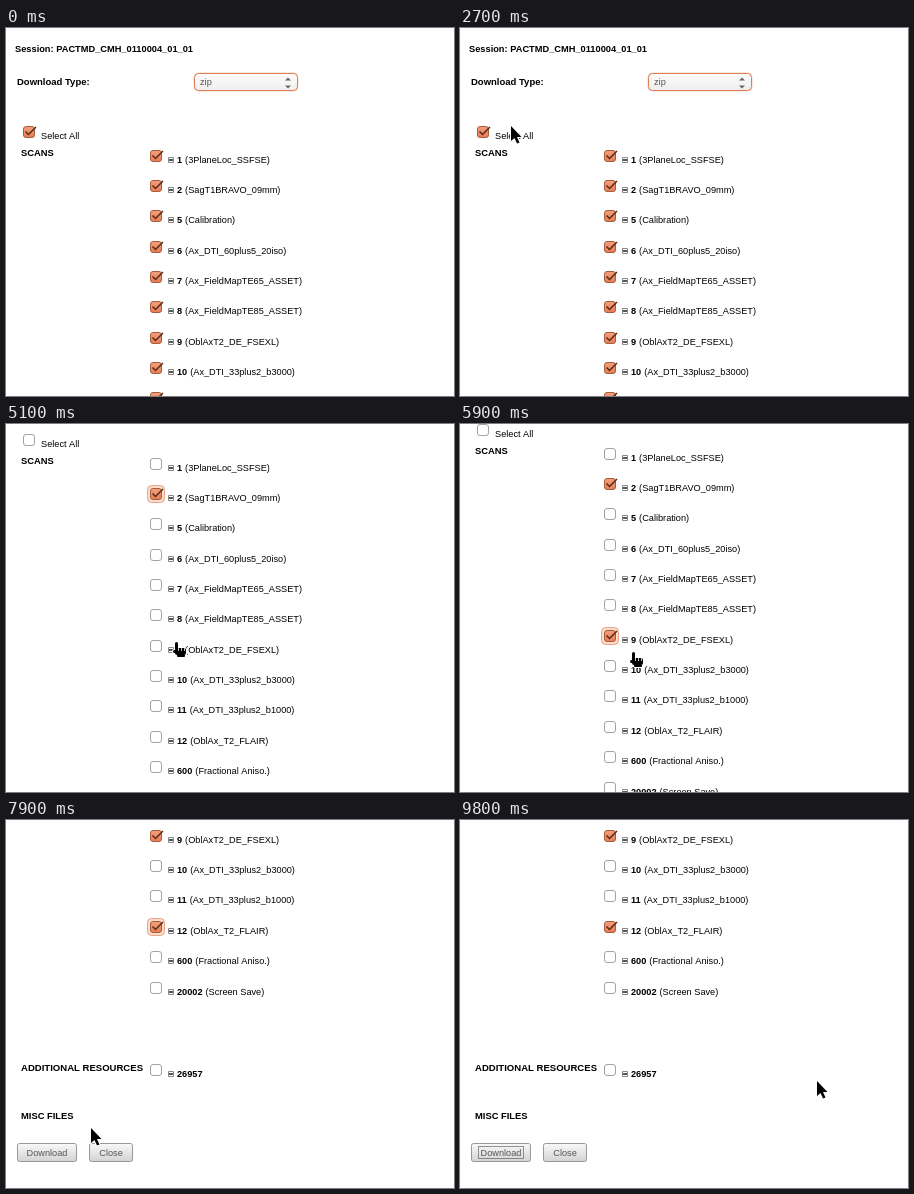
Write an HTML page with a canvas that moves like this. It is 448 px wide and 368 px high and loops after 9900 ms.

```html
<!DOCTYPE html>
<html lang="en">
<head>
<meta charset="utf-8">
<title>Scan download</title>
<style>
html, body { margin: 0; width: 100%; height: 100%; overflow: hidden; background: #fff; }
canvas { display: block; }
</style>
</head>
<body>
<canvas id="stage" width="448" height="368"></canvas>
<script>
const ctx = document.getElementById('stage').getContext('2d');
const LOOP = 9900, STEP = 100;
const SANS = '"Liberation Sans", Arial, sans-serif';
const DIALOG = '"Open Sans", "Noto Sans", sans-serif';
const INK = '#3c3c3c';
const session = 'PACTMD_CMH_0110004_01_01';
const archive = session + '_2_27_2016_19_32_45.zip';

const scans = `1 (3PlaneLoc_SSFSE)
2 (SagT1BRAVO_09mm)
5 (Calibration)
6 (Ax_DTI_60plus5_20iso)
7 (Ax_FieldMapTE65_ASSET)
8 (Ax_FieldMapTE85_ASSET)
9 (OblAxT2_DE_FSEXL)
10 (Ax_DTI_33plus2_b3000)
11 (Ax_DTI_33plus2_b1000)
12 (OblAx_T2_FLAIR)
600 (Fractional Aniso.)
20002 (Screen Save)`.split('\n');

const clearTime = 3100, openTime = 8400, closeTime = 9500;
const pickTimes = { 2: 3900, 9: 5600, 12: 6800 };

// Pointer stops: arrival time and place
const stops = [
  [2300, 215, 90], [2700, 51, 98], [clearTime, 22, 104], [pickTimes[2], 149, 159],
  [4600, 190, 224], [pickTimes[9], 150, 212], [5900, 173, 228], [pickTimes[12], 150, 191],
  [7100, 172, 258], [openTime, 42, 332], [8700, 107, 191], [9400, 390, 268], [9800, 357, 261]
];

function ease(u) {
  u = Math.min(1, Math.max(0, u));
  return u * u * (3 - 2 * u);
}

const scrollAt = t =>
  98 * ease((t - 4700) / 500) + 112 * ease((t - 6000) / 500) + 84 * ease((t - 7300) / 400);

function pointerAt(t) {
  const next = stops.find(s => s[0] >= t) || stops[stops.length - 1];
  const last = stops[Math.max(0, stops.indexOf(next) - 1)];
  const e = ease((t - last[0]) / (next[0] - last[0] || 1));
  return [1, 2].map(i => Math.round(last[i] + (next[i] - last[i]) * e));
}

function text(str, x, y, { size = 9.2, bold = false, color = '#000', font = SANS, align = 'left' } = {}) {
  ctx.font = `${bold ? 'bold ' : ''}${size}px ${font}`;
  ctx.fillStyle = color;
  ctx.textAlign = align;
  ctx.fillText(str, x, y);
  return ctx.measureText(str).width;
}

function paint(fill, stroke) {
  if (fill) { ctx.fillStyle = fill; ctx.fill(); }
  if (stroke) { ctx.strokeStyle = stroke; ctx.lineWidth = 1; ctx.stroke(); }
}

function box(x, y, w, h, r, fill, stroke) {
  ctx.beginPath();
  ctx.roundRect(x + .5, y + .5, w - 1, h - 1, r);
  paint(fill, stroke);
}

function disc(x, y, r, fill, stroke) {
  ctx.beginPath();
  ctx.arc(x, y, r, 0, 7);
  paint(fill, stroke);
}

function bar(x, y, w, h, color) {
  ctx.fillStyle = color;
  ctx.fillRect(x, y, w, h);
}

function fade(y, h, top, bottom) {
  const g = ctx.createLinearGradient(0, y, 0, y + h);
  g.addColorStop(0, top);
  g.addColorStop(1, bottom);
  return g;
}

function spinner(x, y) {
  for (const dir of [-1, 1]) {
    ctx.beginPath();
    ctx.moveTo(x - 3, y + 2.5 * dir);
    ctx.lineTo(x + 3, y + 2.5 * dir);
    ctx.lineTo(x, y + 5.5 * dir);
    paint('#666');
  }
}

function checkbox(x, y, on, focused) {
  if (focused) box(x - 3, y - 3, 18, 18, 4, '#fbdccd', '#e9a486');
  box(x, y, 12, 12, 2.5, on ? fade(y, 12, '#f3a17f', '#e67c53') : '#fff', on ? '#a75d3c' : '#a3a3a3');
  if (!on) return;
  ctx.beginPath();
  ctx.moveTo(x + 2.5, y + 5.5);
  ctx.lineTo(x + 5.5, y + 8.5);
  ctx.lineTo(x + 13, y + 1);
  ctx.strokeStyle = '#5a2a18';
  ctx.lineWidth = 1.5;
  ctx.stroke();
}

function button(label, x, w, y, focused) {
  box(x, y, w, 19, 2, fade(y, 19, '#fafafa', '#d2d2d2'), '#979797');
  text(label, x + w / 2, y + 13, { color: '#555', align: 'center' });
  if (!focused) return;
  ctx.setLineDash([1, 1]);
  box(x + 7, y + 3, w - 14, 13, 0, null, '#333');
  ctx.setLineDash([]);
}

function scanRow(number, name, y, on, focused) {
  checkbox(144, y - 10, on, focused);
  box(162, y - 3, 6, 6, 0, '#fff', '#888');
  bar(163, y - 1, 4, 2, '#555');
  const w = text(number, 171, y + 3, { bold: true });
  text(name, 171 + w + 3, y + 3);
}

function page(t) {
  const cleared = t >= clearTime;
  const lastPick = Object.keys(pickTimes).filter(n => t >= pickTimes[n]).pop();
  const heading = (str, x, y, size = 9.4) => text(str, x, y, { bold: true, size });

  heading('Session: ' + session, 9, 24, 9.27);
  heading('Download Type:', 11, 57, 9.5);
  if (!cleared) box(187, 44, 106, 20, 5, '#f8d5c5');
  box(188, 45, 104, 18, 4, fade(45, 18, '#fdfdfd', '#eee'), cleared ? '#aaa' : '#df7c56');
  text('zip', 194, 57, { color: '#555' });
  spinner(282, 55);

  checkbox(17, 98, !cleared, cleared && !lastPick);
  text('Select All', 35, 111);
  heading('SCANS', 15, 128);
  scans.forEach((line, i) => {
    const [number, ...name] = line.split(' ');
    const on = !cleared || t >= pickTimes[number];
    scanRow(number, name.join(' '), Math.round(131.6 + 30.36 * i), on, number === lastPick && t < openTime);
  });
  heading('ADDITIONAL RESOURCES', 15, 545, 9.55);
  scanRow('26957', '', 548, !cleared);
  heading('MISC FILES', 15, 593);
  button('Download', 11, 60, 617, t >= closeTime);
  button('Close', 83, 44, 617);
}

function dialogButton(label, x, top, bottom, edge) {
  box(x, 257, 79, 25, 4, fade(257, 25, top, bottom), edge);
  text(label, x + 39.5, 274, { font: DIALOG, size: 12.5, color: INK, align: 'center' });
}

function dialog() {
  const say = (str, x, y, opts) => text(str, x, y, { font: DIALOG, size: 12.5, color: INK, ...opts });

  ctx.save();
  ctx.shadowColor = 'rgba(0,0,0,.6)';
  ctx.shadowBlur = 26;
  ctx.shadowOffsetY = 6;
  bar(13, -30, 460, 325, '#f2f1f0');
  ctx.restore();
  bar(13, 0, 435, 9, '#3c3b37');
  ['#e2653a', '#77756e', '#77756e'].forEach((color, i) => disc(25 + 15 * i, -2, 6.5, color));
  say('Opening ' + archive, 62, 3, { bold: true, size: 12.4, color: '#dfdbd2' });

  say('You have chosen to open:', 27, 30, { size: 11.9 });
  box(37, 45, 14, 14, 2, '#e39a4c', '#9a5a22');
  box(41, 49, 8, 7, 1, '#f7dfb8', '#b57432');
  say(archive, 57, 55, { bold: true, size: 12.7 });
  say('which is: Zip archive', 57, 77);
  say('from: http://da55.pet.utoronto.ca:5004', 57, 96);
  say('What should Firefox do with this file?', 27, 124, { bold: true });

  disc(64, 151.5, 5.5, '#fff', '#8c8984');
  say('Open with', 75, 156);
  bar(75, 158, 9, 1, INK);
  box(146, 139, 268, 25, 4, fade(139, 25, '#fdfdfd', '#e9e7e5'), '#b1ada7');
  say('Archive Manager (default)', 153, 156);
  spinner(403, 152);

  box(73, 169, 342, 19, 3, '#f6d6c8', '#eb9069');
  disc(64, 178.5, 5.5, '#ee8157', '#9c4a2a');
  disc(64, 178.5, 2.2, '#4a2113');
  say('Save File', 75, 183);
  bar(75, 185, 7, 1, INK);
  box(58, 201, 12, 12, 2, '#fff', '#8c8984');
  say('Do this automatically for files like this from now on.', 75, 212);
  bar(119, 214, 7, 1, INK);

  dialogButton('Cancel', 263, '#fefefe', '#e4e2df', '#aaa59f');
  dialogButton('OK', 354, '#f9ab89', '#ee875e', '#c2633d');
}

const arrow = new Path2D('M0 0V15L3.5 12 6 17.5 8.5 16.5 6 11H10.5Z');
const hand = new Path2D();
hand.roundRect(-1, 0, 3, 10, 1.5);
hand.roundRect(-1, 6, 11, 7, 2);
hand.roundRect(-3, 8, 5, 3, 1.5);
hand.roundRect(1, 9, 8, 6, 1);

function pointer(t) {
  if (t < stops[0][0]) return;
  const pointing = t >= 4300 && t < 7400;
  const path = pointing ? hand : arrow;
  ctx.save();
  ctx.translate(...pointerAt(t));
  ctx.lineJoin = 'round';
  ctx.lineWidth = 2;
  ctx.strokeStyle = '#fff';
  ctx.stroke(path);
  ctx.fillStyle = '#000';
  ctx.fill(path);
  if (pointing) for (let x = 2; x < 9; x += 3) bar(x, 6, 1, 3, '#bbb');
  ctx.restore();
}

function draw() {
  const t = Math.floor(performance.now() % LOOP / STEP) * STEP;
  bar(0, 0, 448, 368, '#fff');
  ctx.save();
  ctx.translate(0, -Math.round(scrollAt(t)));
  page(t);
  ctx.restore();
  if (t >= openTime && t < closeTime) dialog();
  pointer(t);
  requestAnimationFrame(draw);
}
draw();
</script>
</body>
</html>
```
